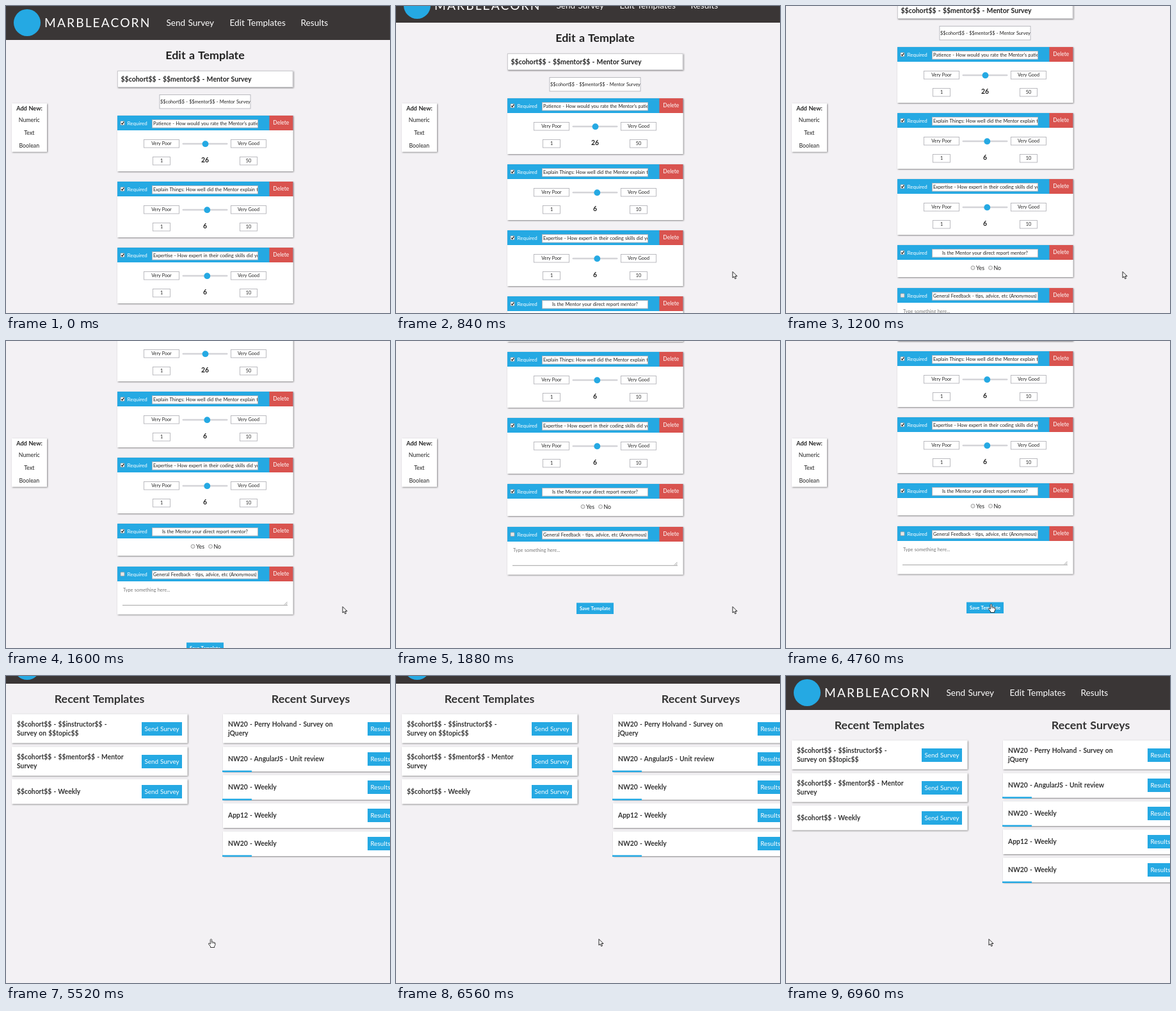
An HTML page for the animation above (7 s loop, 600x479 px).

```html
<!DOCTYPE html>
<html lang="en">
<head>
<meta charset="utf-8">
<title>Survey templates</title>
<style>
html, body { margin: 0; height: 100%; overflow: hidden; background: #f3f1f4; }
svg { display: block; width: 100vw; height: 100vh; }
text { font-family: Lato, "Open Sans", sans-serif; word-spacing: .06em; white-space: pre; }
</style>
</head>
<body>
<svg id="stage" viewBox="0 0 600 479" preserveAspectRatio="none">
  <defs>
    <filter id="shadow" x="-5%" y="-15%" width="110%" height="130%">
      <feDropShadow dx=".9" dy=".9" stdDeviation=".9" flood-color="#555" flood-opacity=".75"/>
    </filter>
    <clipPath id="field"><rect x="229" y="-40" width="164" height="800"/></clipPath>
    <clipPath id="subject"><rect x="241" y="100" width="141" height="80"/></clipPath>
  </defs>
  <rect width="600" height="479" fill="#f3f1f4"/>
  <g id="editor"></g>
  <g id="home"></g>
  <g id="panel"></g>
  <g id="arrow">
    <path d="M0 0V9.6L2.2 7.6L3.8 11.2L5.5 10.4L3.9 7H7Z" fill="#fff" stroke="#111" stroke-width=".9" stroke-linejoin="round"/>
  </g>
  <g id="hand">
    <path d="M-1.2 .8Q0 -.9 1.1 .8V4.6Q2.4 3.7 3.2 5Q4.5 4.3 5.1 5.5Q6.4 5.2 6.4 6.8V9.2L5.2 11.2V13H-1V11.4L-4 7.8Q-4.3 6.2 -2.7 6.5L-1.2 7.8Z" fill="#fff" stroke="#222" stroke-width=".9" stroke-linejoin="round"/>
    <path d="M1.1 4.6V7M3.2 5V7.2M5.1 5.5V7.4" fill="none" stroke="#222" stroke-width=".6"/>
  </g>
</svg>
<script>
const LOOP = 7000, STEP = 40, SWITCH = 5440, ARROW_BACK = 5560;
const BLUE = '#25a9e3', RED = '#d9534f', DARK = '#3a3636', INK = '#222';
const $ = id => document.getElementById(id);

const rect = (x, y, w, h, fill, more = '') =>
  `<rect x="${x}" y="${y}" width="${w}" height="${h}" fill="${fill}" ${more}/>`;

// y is the middle of the capitals
const text = (s, x, y, size, { fill = INK, weight = 400, anchor = 'start', more = '' } = {}) =>
  `<text x="${x}" y="${y + size * .36}" font-size="${size}" font-weight="${weight}" fill="${fill}" text-anchor="${anchor}" ${more}>${s}</text>`;

const mid = (s, x, y, size, opts = {}) => text(s, x, y, size, { anchor: 'middle', ...opts });
const box = (x, y, w, h) => rect(x, y, w, h, '#fff', 'filter="url(#shadow)"');
const field = (x, y, w, h) => rect(x + .5, y + .5, w - 1, h - 1, '#fff', 'stroke="#b4b4ba" stroke-width=".9"');
const button = (s, x, y, w, h, size, weight) =>
  rect(x, y, w, h, BLUE) + mid(s, x + w / 2, y + h / 2, size, { fill: '#fff', weight });

function header() {
  const nav = [['Send Survey', 250.5], ['Edit Templates', 349.5], ['Results', 460.5]];
  return rect(0, 0, 600, 53, DARK) +
    `<circle cx="33" cy="26" r="21" fill="${BLUE}"/>` +
    text('MARBLEACORN', 60, 26.3, 19.2, { fill: '#fff', more: 'letter-spacing="2.1"' }) +
    nav.map(([s, x]) => text(s, x, 26.3, 13.6, { fill: '#fff' })).join('');
}

function checkbox(y, on) {
  return rect(179, y + 8.7, 6, 6, on ? '#fff' : '#e6e6e6', 'rx=".8" stroke="#9a9a9a" stroke-width=".7"') +
    (on ? `<path d="M180.2 ${y + 11.6}l1.5 1.7l2.5 -3.7" fill="none" stroke="#111" stroke-width="1.2"/>` : '');
}

function card(y, h, title, on, body, centered) {
  const name = centered ? mid(title, 311, y + 12, 7.4) : text(title, 230, y + 12, 7.4);
  return box(174, y, 274.5, h) + rect(174, y, 274.5, 23, BLUE) + rect(411.5, y, 37, 23, RED) +
    checkbox(y, on) +
    text('Required', 189.5, y + 12, 8, { fill: '#fff' }) +
    field(228, y + 6, 166, 13.5) + `<g clip-path="url(#field)">${name}</g>` +
    mid('Delete', 429.8, y + 11, 8.5, { fill: '#fff' }) + body;
}

function numeric(y, title, value, max, knob) {
  const cell = (s, x, dy, w) => field(x, y + dy, w, 13.5) + mid(s, x + w / 2, y + dy + 6.7, 7.2);
  return card(y, 87, title, true,
    cell('Very Poor', 215, 37, 56) + cell('Very Good', 351, 37, 56) +
    rect(275.5, y + 42.7, 71, 2.6, '#d4d4d8', 'rx="1.3"') +
    `<circle cx="${knob}" cy="${y + 44.2}" r="4.9" fill="${BLUE}"/>` +
    cell('1', 229, 64, 28) + cell(max, 365, 64, 28) +
    mid(value, 311, y + 69, 10.4, { weight: 700 }));
}

function radio(s, x, y) {
  return `<circle cx="${x}" cy="${y}" r="3" fill="#eee" stroke="#8c8c8c" stroke-width=".8"/>` +
    text(s, x + 5, y + .6, 8.8);
}

function editor() {
  const name = '$$cohort$$ - $$mentor$$ - Mentor Survey';
  const feedback = text('Type something here...', 183, 583.5, 7.35, { fill: '#777' }) +
    `<path d="M182 607.3H440" stroke="#999" stroke-width=".9"/>` +
    `<path d="M435 606.5l4.5 -4.5M437.5 606.5l2 -2" stroke="#777" stroke-width=".7"/>`;
  return header() +
    mid('Edit a Template', 311, 76.5, 17.9, { weight: 700 }) +
    box(174, 101, 274.5, 26) + rect(174.5, 101.5, 273.5, 25, 'none', 'stroke="#c4c4c8" stroke-width=".8"') +
    text(name, 179.5, 114, 10.5, { weight: 700 }) +
    field(239.5, 138, 143, 22.5) +
    `<g clip-path="url(#subject)">${text(name, 241, 149.3, 7.3)}</g>` +
    numeric(171, 'Patience - How would you rate the Mentor\'s patience?', '26', '50', 311.5) +
    numeric(274, 'Explain Things: How well did the Mentor explain things?', '6', '10', 314.3) +
    numeric(377, 'Expertise - How expert in their coding skills did you find them?', '6', '10', 314.3) +
    card(480, 50, 'Is the Mentor your direct report mentor?', true,
      radio('Yes', 292, 515.5) + radio('No', 319.5, 515.5), true) +
    card(547, 74.5, 'General Feedback - tips, advice, etc (Anonymous)', false, feedback) +
    button('Save Template', 282, 665.5, 58, 17.5, 7.5, 700);
}

function item(x, y, lines, label, bx, bw, bar) {
  const h = lines.length > 1 ? 45 : 38.5, c = y + h / 2;
  const top = c - (lines.length - 1) * 7.2;
  return box(x, y, 274.5, h) +
    lines.map((s, i) => text(s, x + 8, top + i * 14.4, 10.35, { weight: 700, fill: '#333' })).join('') +
    button(label, bx, Math.round(c - 10.5), bw, 21, 9.9) +
    (bar ? rect(x - 1, y + h - 1.5, 46, 2.5, BLUE) : '');
}

function home() {
  const big = { weight: 700, fill: '#333' };
  const left = (y, ...lines) => item(9, y, lines, 'Send Survey', 212, 63);
  const right = (y, bar, ...lines) => item(339, y, lines, 'Results', 565, 40, bar);
  return header() +
    mid('Recent Templates', 146, 76.5, 17.9, big) + mid('Recent Surveys', 476, 76.5, 17.9, big) +
    left(100.5, '$$cohort$$ - $$instructor$$ -', 'Survey on $$topic$$') +
    left(151.5, '$$cohort$$ - $$mentor$$ - Mentor', 'Survey') +
    left(202, '$$cohort$$ - Weekly') +
    right(100.5, false, 'NW20 - Perry Holvand - Survey on', 'jQuery') +
    right(151.5, true, 'NW20 - AngularJS - Unit review') +
    right(195.5, true, 'NW20 - Weekly') +
    right(239.5, false, 'App12 - Weekly') +
    right(283.5, true, 'NW20 - Weekly');
}

function panel() {
  return box(9, 152, 55, 75.5) + mid('Add New:', 36.5, 159.8, 9.1, { weight: 700 }) +
    ['Numeric', 'Text', 'Boolean'].map((s, i) => mid(s, 36.3, 177.8 + i * 19.8, 8.8)).join('');
}

$('editor').innerHTML = editor();
$('home').innerHTML = home();
$('panel').innerHTML = panel();

const EDIT_SCROLL = [[720, 0], [1200, 107], [1600, 195], [1880, 257], [1960, 258]];
const HOME_SCROLL = [[6680, 41], [6800, 20], [6960, 0]];
const POINTER = [
  [40, 604, 484], [200, 580, 460], [440, 540, 424], [680, 526, 414.5],
  [2240, 526, 414.5], [2440, 425, 467], [2640, 330, 457.5],
  [3800, 330, 457.5], [4000, 327, 440], [4240, 321, 417], [4440, 320.5, 410.5],
  [5520, 320.5, 410.5], [5600, 317, 410.5]
];

// Linear interpolation over [time, value...] rows
function at(rows, t, k = 1) {
  const i = rows.findIndex(r => r[0] > t);
  if (i === 0) return rows[0][k];
  if (i < 0) return rows[rows.length - 1][k];
  const a = rows[i - 1], b = rows[i];
  return a[k] + (b[k] - a[k]) * (t - a[0]) / (b[0] - a[0]);
}

const move = (id, x, y) => $(id).setAttribute('transform', `translate(${x} ${y})`);
const show = (id, on) => $(id).setAttribute('display', on ? 'inline' : 'none');

function draw(t) {
  const editing = t < SWITCH;
  show('editor', editing);
  show('panel', editing);
  show('home', !editing);
  move('editor', 0, -Math.round(at(EDIT_SCROLL, t)));
  move('home', 0, -Math.round(at(HOME_SCROLL, t)));

  const x = at(POINTER, t, 1), y = at(POINTER, t, 2);
  const link = t > 3800 && t < ARROW_BACK && y < 425;
  show('hand', link);
  show('arrow', !link);
  move(link ? 'hand' : 'arrow', x, y);
}

let start;
function tick(now) {
  start ??= now;
  draw(Math.floor((now - start) % LOOP / STEP) * STEP);
  requestAnimationFrame(tick);
}
draw(0);
requestAnimationFrame(tick);
</script>
</body>
</html>
```
